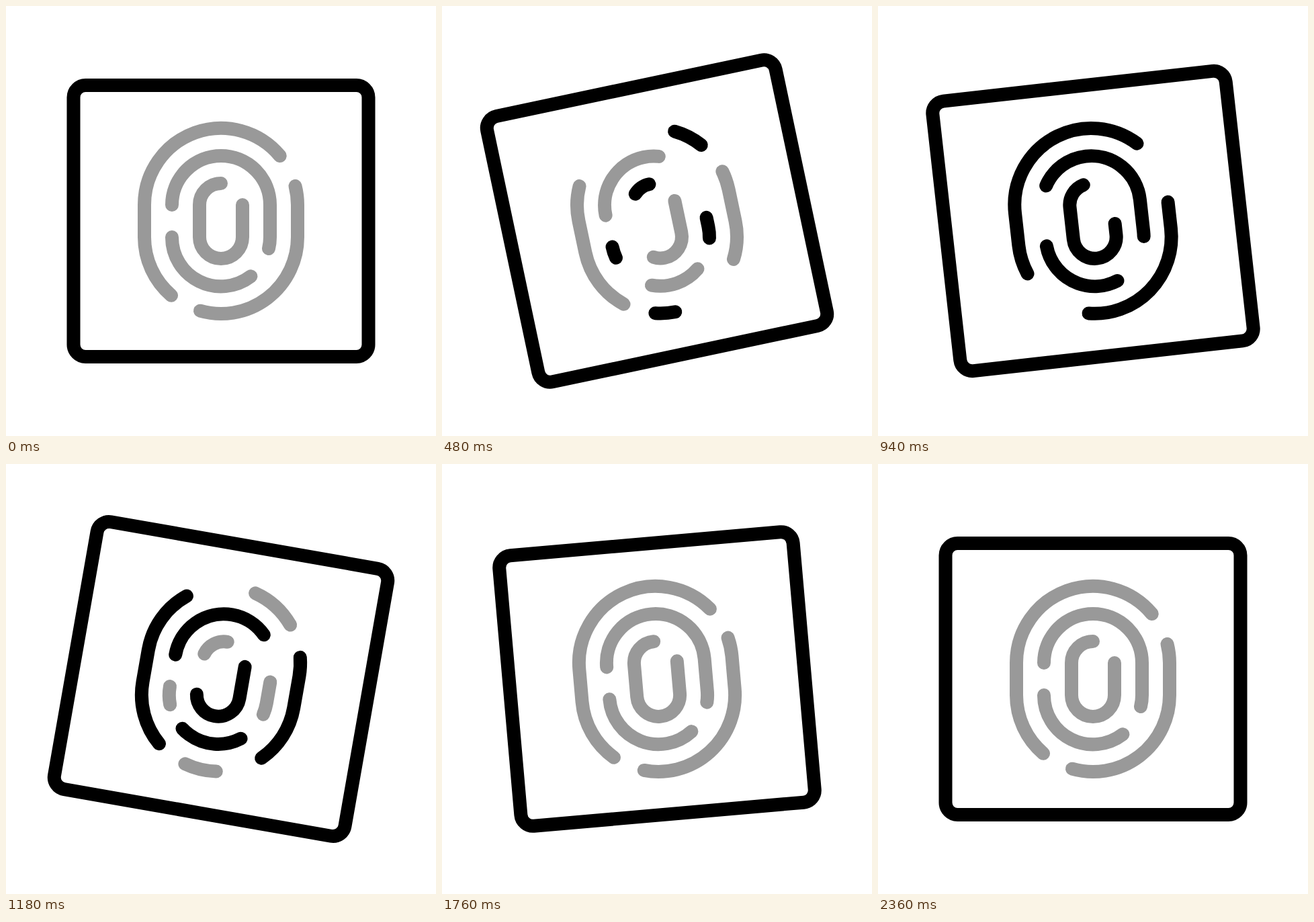
An HTML page for the animation above (2420 ms loop, 640 by 640 pixels).

```html
<!DOCTYPE html>
<html lang="en">
<head>
<meta charset="utf-8">
<title>Fingerprint scan</title>
<style>
  html, body { margin: 0; height: 100%; overflow: hidden; background: #fff; }
  svg { display: block; width: 100%; height: 100%; }
</style>
</head>
<body>
<svg viewBox="0 0 640 640" fill="none" stroke-width="20" stroke-linecap="round">
  <g id="card">
    <rect x="100.5" y="118" width="439" height="404" rx="18" stroke="#000"/>
  </g>
</svg>
<script>
const LOOP = 2420, STEP = 20;
const GRAY = '#999', BLACK = '#000';
const card = document.getElementById('card');

// Each ridge runs from the end where the colour change begins.
const ridges = [
  'M407.7 223A114 114 0 0 0 206 296V344A114 114 0 0 0 246 430.8',
  'M289 453.7A114 114 0 0 0 434 344V296A114 114 0 0 0 430.5 268',
  'M391 361A73 73 0 0 0 393 344V296A73 73 0 0 0 247 296',
  'M247 344A73 73 0 0 0 364.4 402.3',
  'M320 264A32 32 0 0 0 288 296V344A32 32 0 0 0 352 344V296'
];

// Swing keys: [time in steps, degrees]
const swing = [[0, 0], [37, -15], [60.5, 10], [87.5, -5], [109.5, 1], [118, 0]];

const progress = (t, from, to) => Math.min(1, Math.max(0, (t - from) / (to - from)));
const smooth = x => x * x * (3 - 2 * x);
const sharp = x => x ** 2.2 / (x ** 2.2 + (1 - x) ** 2.2);
const ramp = (t, from, to) => smooth(progress(t, from, to));

function angleAt(t) {
  let angle = 0;
  for (let i = 1; i < swing.length; i++) {
    const [t0, a0] = swing[i - 1], [t1, a1] = swing[i];
    angle += (a1 - a0) * sharp(progress(t, t0, t1));
  }
  return angle;
}

function makeLayer(color) {
  return ridges.map(d => {
    const path = document.createElementNS('http://www.w3.org/2000/svg', 'path');
    path.setAttribute('d', d);
    path.setAttribute('pathLength', 1);
    path.setAttribute('stroke', color);
    return card.appendChild(path);
  });
}

function trim(layer, from, to) {
  for (const path of layer) {
    path.style.display = to - from > 0.0005 ? '' : 'none';
    path.setAttribute('stroke-dasharray', `${Math.max(0, to - from)} 2`);
    path.setAttribute('stroke-dashoffset', -from);
  }
}

const fading = makeLayer(GRAY), returning = makeLayer(GRAY), scan = makeLayer(BLACK);

function draw(now) {
  const t = (now % LOOP) / STEP;
  card.setAttribute('transform', `rotate(${angleAt(t)} 320 320)`);
  trim(fading, ramp(t, 0, 46.1), 1);
  trim(scan, ramp(t, 43.1, 79), ramp(t, 16, 56));
  trim(returning, 0, ramp(t, 48.8, 88.2));
  requestAnimationFrame(draw);
}
draw(0);
</script>
</body>
</html>
```
